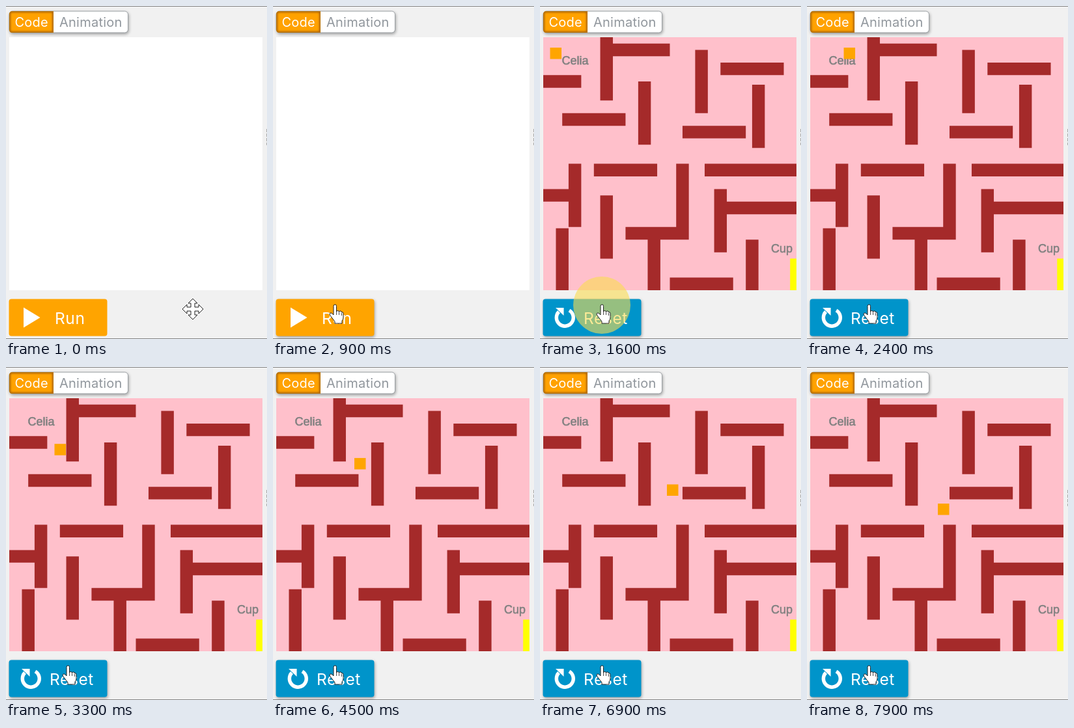
Write an HTML page that moves like this. It is 401x512 px and loops after 8000 ms.

```html
<!DOCTYPE html>
<html lang="en">
<head>
<meta charset="utf-8">
<title>Maze game</title>
<style>
html, body { margin: 0; width: 100%; height: 100%; overflow: hidden; background: #f1f1f1; }
svg { display: block; }
.ui { font: 20px Inter, sans-serif; letter-spacing: .25px; }
.big { font-size: 24.5px; letter-spacing: .6px; fill: #fff; }
.label { font: 18px "Liberation Sans", Arial, sans-serif; fill: #808080; stroke: #808080; stroke-width: .6; }
.raised { filter: drop-shadow(1px 2px 2px #0005); }
.cursor { fill: #fff; stroke: #222; stroke-linejoin: round; }
</style>
</head>
<body>
<svg width="401" height="512" viewBox="0 0 401 512">
  <defs>
    <clipPath id="tab"><path d="M73 8V41H10q-5 0-5-5V13q0-5 5-5z"/></clipPath>
    <clipPath id="board"><rect width="400" height="400"/></clipPath>
  </defs>
  <rect width="401" height="512" fill="#f1f1f1"/>
  <path d="M0 .5H401M0 511.5H401" stroke="#858585"/>
  <path d="M400.5 189V214" stroke="#aaa" stroke-dasharray="5 2"/>

  <g class="ui">
    <rect class="raised" x="5" y="8" width="182.5" height="33" rx="5" fill="#fff" stroke="#9a9fa3"/>
    <g clip-path="url(#tab)">
      <rect x="5" y="8" width="68" height="33" fill="#ffa200"/>
      <rect x="5" y="8" width="68" height="33" rx="4" fill="none" stroke="#a86400" stroke-width="4" style="filter: blur(1.5px)"/>
    </g>
    <text x="13.5" y="32" fill="#fff">Code</text>
    <text x="82" y="32" fill="#91979d">Animation</text>
  </g>

  <rect x="5" y="48" width="389" height="389" fill="#fff"/>
  <g id="game">
    <g transform="translate(5 48) scale(.9725)" clip-path="url(#board)">
      <rect width="400" height="400" fill="#ffc0cb"/>
      <path id="walls" fill="#a52a2a"/>
      <rect x="390" y="350" width="10" height="50" fill="#ff0"/>
    </g>
    <text class="label" x="33.5" y="90">Celia</text>
    <text class="label" x="355" y="379">Cup</text>
    <rect id="player" width="17.5" height="17.5" fill="#ffa500"/>
  </g>

  <g class="ui big">
    <rect id="button" x="4.5" y="450.5" width="151" height="57" rx="4"/>
    <g id="run">
      <path d="M27 463.5L52.5 479L27 494.5z"/>
      <text x="75" y="488.5">Run</text>
    </g>
    <g id="reset">
      <path d="M45 468A13 13 0 1 1 29 470" fill="none" stroke="#fff" stroke-width="5.5"/>
      <path d="M24 464H36.5V476z"/>
      <text x="67" y="488.5">Reset</text>
    </g>
  </g>

  <circle id="press" cx="95" cy="460" r="44" fill="#fbdd50" fill-opacity=".6"/>
  <path id="move" class="cursor" d="M0-16l7 7h-4v6h6v-4l7 7-7 7v-4h-6v6h4l-7 7-7-7h4v-6h-6v4l-7-7 7-7v4h6v-6h-4z"/>
  <g id="hand" class="cursor">
    <path d="M-2 1.5q0-2.5 2.3-2.5t2.2 2.5V10q0-1.5 2-1.5t2 2q0-1.5 2-1.5t2 2q2-1.3 2.5 1.5V19q0 3-2 5v4H0v-3L-7 16q-2-3 0-4t5 3z"/>
    <path d="M2.5 10v5M6.5 11v4M10.5 12v4" fill="none" stroke-width=".8"/>
  </g>
</svg>
<script>
const LOOP = 8000, STEP = 100;
const el = id => document.getElementById(id);
const show = (id, on) => el(id).style.display = on ? "" : "none";
const place = (id, x, y) => el(id).setAttribute("transform", `translate(${x} ${y})`);

// Every wall is a 100 by 20 bar; longer ones overlap or run off the board.
const bars = (corners, w, h) => corners.map(c => `M${c}h${w}v${h}h${-w}z`).join("");
const across = ["100 10", "280 40", "-40 60", "30 120", "220 140", "80 200", "255 200", "300 200",
  "-60 240", "270 260", "300 260", "130 300", "200 380"];
const upright = ["90 0", "240 20", "330 75", "150 70", "40 200", "210 200", "90 250", "270 240",
  "20 302", "165 320", "320 320"];
el("walls").setAttribute("d", bars(across, 100, 20) + bars(upright, 20, 100));

// The player walks at one speed, rests at each corner and turns.
const legs = [59, 82, 50.5, -53, 70, 117, 6]; // sideways and vertical in turn
const SPEED = .1, REST = 178, START = 1990;

function player(t) {
  const pos = [15.5, 64];
  let left = t - START;
  legs.forEach((leg, i) => {
    const time = Math.abs(leg) / SPEED;
    pos[i % 2] += leg * Math.min(1, Math.max(0, left / time));
    left -= time + REST;
  });
  return pos;
}

function draw(t) {
  const k = Math.min(1, t / 800);
  const x = 287 - 192 * k, y = 466 - 6 * k;
  const over = x < 155, started = t >= 1400;
  show("game", t >= 1600);
  place("player", ...player(t));
  show("run", !started);
  show("reset", started);
  el("button").setAttribute("fill", started ? "#0094ca" : "#ffa400");
  el("button").setAttribute("class", over ? "raised" : "");
  show("press", t >= 1300 && t < 1800);
  show("move", !over);
  show("hand", over);
  place(over ? "hand" : "move", x, y);
}

function tick() {
  draw(Math.floor(performance.now() % LOOP / STEP) * STEP);
  requestAnimationFrame(tick);
}
tick();
</script>
</body>
</html>
```
